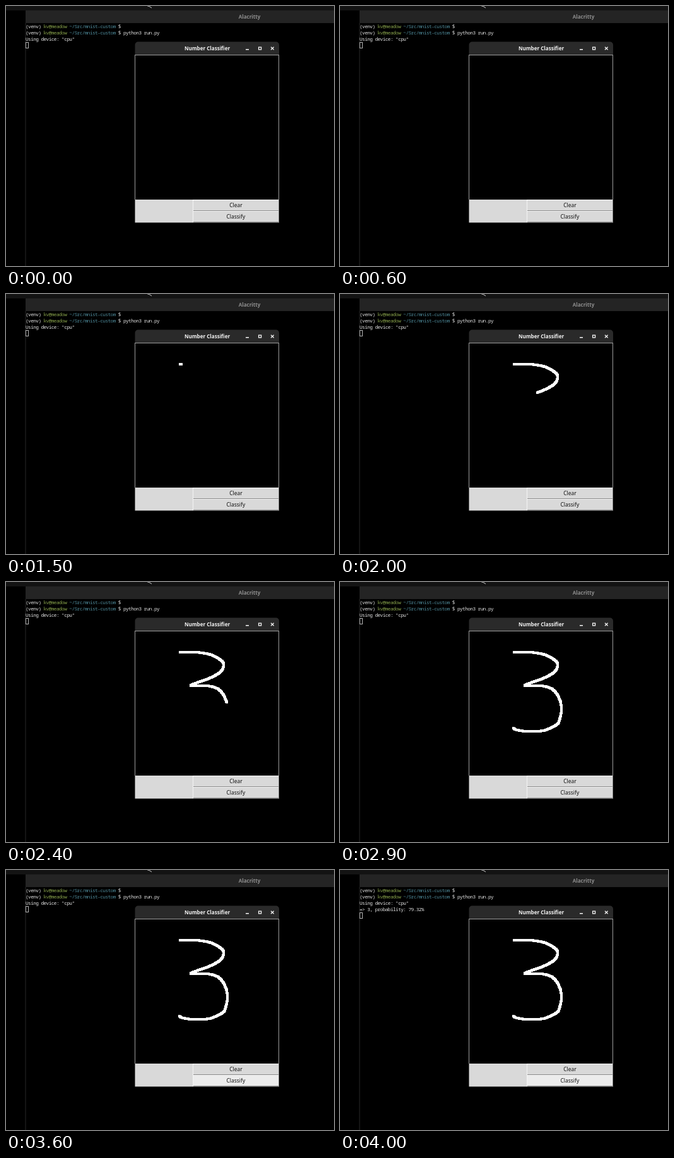
These frames come from a looping animation (520 by 411 pixels, 4200 ms). An HTML page with a canvas:

```html
<!DOCTYPE html>
<html lang="en">
<head>
<meta charset="utf-8">
<title>Number Classifier</title>
<style>
  html, body { margin: 0; width: 100%; height: 100%; overflow: hidden; background: #000; }
  canvas, svg { position: absolute; left: 0; top: 0; width: 520px; height: 411px; display: block; }
  text { white-space: pre; }
  .term { font: 7.8px "Noto Sans Mono", "DejaVu Sans Mono", monospace; letter-spacing: -.6px; fill: #e2e2e2; }
  .ui { font: 8.45px "Noto Sans", "Open Sans", sans-serif; fill: #111; text-anchor: middle; }
  .ui.bold { font-size: 8.05px; font-weight: 700; fill: #f2f2f2; }
  .ui.dim { fill: #8d8d8d; }
  .user { fill: #86a04a; }
  .path { fill: #4f8c9c; }
</style>
</head>
<body>
<canvas id="stage" width="520" height="411"></canvas>
<svg viewBox="0 0 520 411">
  <text class="ui bold dim" x="386" y="20">Alacritty</text>
  <g class="term">
    <text x="31" y="35">(venv) <tspan class="user">kv@meadow</tspan> <tspan class="path">~/Src/mnist-custom</tspan> $</text>
    <text x="31" y="45">(venv) <tspan class="user">kv@meadow</tspan> <tspan class="path">~/Src/mnist-custom</tspan> $ python3 run.py</text>
    <text x="31" y="55">Using device: "cpu"</text>
    <text x="31" y="65" id="result">=&gt; 3, probability: 79.32%</text>
  </g>
  <text class="ui bold" x="319" y="70">Number Classifier</text>
  <text class="ui" x="364.4" y="318">Clear</text>
  <text class="ui" x="364.4" y="336">Classify</text>
</svg>
<script>
const LOOP = 4200, STEP = 100;
const DRAW_START = 1500, DRAW_MID = 2400, DRAW_END = 2900;
const HOVER = 3600, RESULT = 3900;
const PEN = 4;

const ctx = document.getElementById('stage').getContext('2d');
const result = document.getElementById('result');

const upper = [[276, 111], [301, 111], [325, 115], [340, 123], [345, 131],
  [340, 142], [325, 151], [306, 158], [293, 163]];
const middle = [[293, 164], [318, 164], [334, 168], [343, 176], [350, 190]];
const lower = [[350, 190], [351, 203], [348, 218], [343, 226], [322, 235],
  [297, 236], [281, 234], [275, 231]];

// Catmull-Rom curve sampled about once per pixel
function sample(knots) {
  const out = [];
  const at = i => knots[Math.max(0, Math.min(knots.length - 1, i))];
  for (let i = 0; i < knots.length - 1; i++) {
    const [a, b, c, d] = [at(i - 1), at(i), at(i + 1), at(i + 2)];
    const n = Math.ceil(Math.hypot(c[0] - b[0], c[1] - b[1]));
    for (let k = 0; k < n; k++) {
      const u = k / n;
      out.push([0, 1].map(j => b[j] + 0.5 * u * (c[j] - a[j]
        + u * (2 * a[j] - 5 * b[j] + 4 * c[j] - d[j]
        + u * (3 * (b[j] - c[j]) + d[j] - a[j])))));
    }
  }
  out.push(knots[knots.length - 1]);
  return out;
}

const first = [...sample(upper), ...sample(middle)];
const stroke = [...first, ...sample(lower)];

function rect(color, x, y, w, h) {
  ctx.fillStyle = color;
  ctx.fillRect(x, y, w, h);
}

function line(color, width, ...pts) {
  ctx.strokeStyle = color;
  ctx.lineWidth = width;
  ctx.beginPath();
  pts.forEach(([x, y]) => ctx.lineTo(x, y));
  ctx.stroke();
}

function box(color, x, y, w, h, width = 1) {
  ctx.strokeStyle = color;
  ctx.lineWidth = width;
  ctx.strokeRect(x, y, w, h);
}

function button(y, face) {
  rect(face, 296, y, 137, 18);
  rect('#f4f4f4', 296, y, 137, 1);
  rect('#f4f4f4', 296, y, 1, 18);
  rect('#8a8a8a', 297, y + 17, 136, 1);
  rect('#8a8a8a', 432, y, 1, 18);
}

function drawnCount(t) {
  if (t < DRAW_START) return 0;
  if (t < DRAW_MID) {
    const u = (t - DRAW_START) / (DRAW_MID - DRAW_START);
    return Math.round(4 + u * (first.length - 4));
  }
  const u = Math.min(1, (t - DRAW_MID) / (DRAW_END - DRAW_MID));
  return Math.round(first.length + u * (stroke.length - first.length));
}

function desktop(done) {
  rect('#000', 0, 0, 520, 411);
  rect('#131313', 0, 0, 520, 7);
  line('#ccc', 1, [226, 0], [231, 3]);
  line('#aaa', 1, [224.5, 0.5], [227, 0.5]);
  rect('#242424', 31, 7, 489, 20);
  rect('#292929', 30.5, 27, 1, 384);
  box('#b4b4b4', 31.5, done ? 67.5 : 57.5, 4, 9);
}

function appWindow(t) {
  ctx.fillStyle = '#2a2a2a';
  ctx.beginPath();
  ctx.roundRect(204.5, 56.5, 228.5, 22, [5, 5, 0, 0]);
  ctx.fill();
  rect('#f5f5f5', 380, 68, 5, 1.5);
  box('#f5f5f5', 400.6, 65.1, 4, 3.8, 1.3);
  line('#f5f5f5', 1.3, [420, 64.7], [424.6, 69.3]);
  line('#f5f5f5', 1.3, [424.6, 64.7], [420, 69.3]);

  rect('#9c9c9c', 204, 77, 229, 229);
  rect('#000', 205, 78, 227, 228);
  rect('#d9d9d9', 204.5, 306, 228.5, 36.4);
  button(306, '#d9d9d9');
  button(324, t >= HOVER ? '#ececec' : '#d9d9d9');

  const n = drawnCount(t);
  for (let i = 0; i < n; i++) {
    const [x, y] = stroke[i];
    rect('#fff', Math.round(x - PEN / 2), Math.round(y - PEN / 2), PEN, PEN);
  }
}

const start = performance.now();
function frame() {
  const now = (performance.now() - start) % LOOP;
  const t = Math.floor(now / STEP) * STEP;
  const done = t >= RESULT;
  desktop(done);
  appWindow(t);
  result.style.visibility = done ? 'visible' : 'hidden';
  requestAnimationFrame(frame);
}
frame();
</script>
</body>
</html>
```
